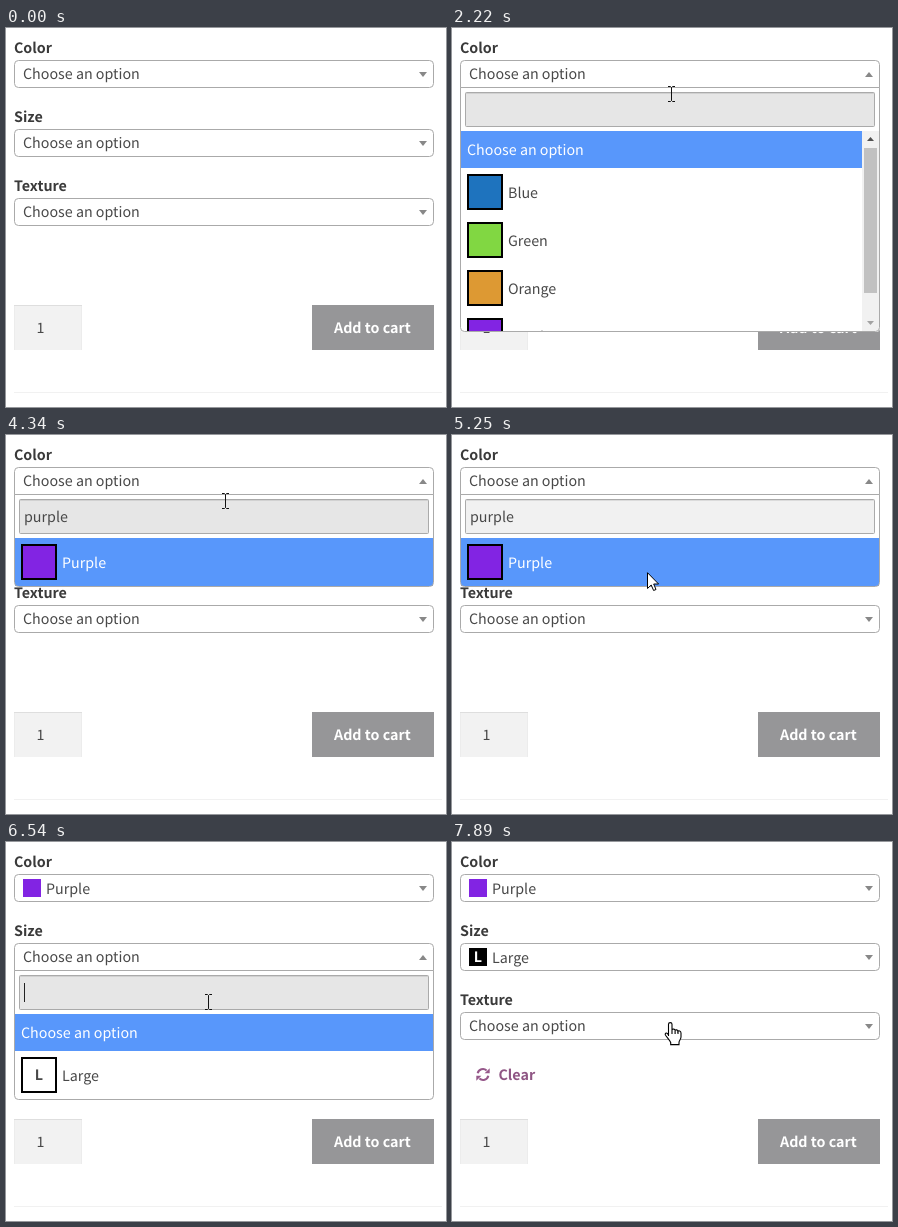
Write an HTML page that moves like this. It is 440 px wide and 379 px high and loops after 7.99 s.

```html
<!DOCTYPE html>
<html lang="en">
<head>
<meta charset="utf-8">
<title>Product options</title>
<style>
  html, body { margin: 0; width: 100%; height: 100%; overflow: hidden; background: #fff; }
  svg { display: block; width: 440px; height: 379px; }
  text {
    font: 14.29px "Noto Sans CJK JP", "Noto Sans CJK SC", "Noto Sans CJK", "Noto Sans", sans-serif;
    fill: #484848;
    text-rendering: geometricPrecision;
    white-space: pre;
  }
  .bold { font-weight: 700; }
  .label { font-weight: 700; fill: #3a3a3a; }
  .white { fill: #fff; }
  .mid { text-anchor: middle; }
</style>
</head>
<body>
<svg id="stage" viewBox="0 0 440 379"></svg>
<script>
const LOOP = 7990;
const PURPLE = '#8224e3', BLUE = '#5897fb';
const stage = document.getElementById('stage');

// Each table holds [start time, value]; the latest started value counts.
const OPEN = [[0, ''], [1580, 'color'], [5350, ''], [6080, 'size'], [7340, '']];
const TYPED = [[0, ''], [3060, 'p'], [3240, 'pu'], [3420, 'pur'], [3610, 'purp'],
  [3695, 'purpl'], [3780, 'purple'], [5350, '']];
const CARET = [[0, 1], [2140, 0], [2600, 1], [4340, 0], [4790, 1], [5170, 0],
  [6080, 1], [6620, 0]];
const FOCUS = [[0, 1], [5170, 0], [6080, 1], [7160, 0]];
const POINTER = [[0, ''], [220, 'arrow'], [1400, 'hand'], [2220, 'beam'], [4790, 'arrow'],
  [5710, 'hand'], [6440, 'beam'], [6620, 'hand'], [7340, 'arrow'], [7800, 'hand']];

// Pointer moves: first step, last step, steps, end x, end y, sideways bow.
const START = [213, 330];
const MOVES = [
  [220, 950, 9, 228, 269, 25],
  [1030, 1400, 5, 217, 47, 0],
  [2140, 2220, 2, 219, 66, 0],
  [4700, 4880, 3, 204, 147, 0],
  [5080, 5250, 3, 195, 137, 0],
  [5440, 5980, 7, 227, 110, 0],
  [6440, 6800, 5, 164, 234, 0],
  [7520, 7890, 5, 218, 180, 0]
];

const COLORS = [['Blue', '#1e73be'], ['Green', '#81d742'], ['Orange', '#dd9933'], ['Purple', PURPLE]];

const SHAPES = {
  arrow: '<path fill="#fff" stroke="#000" d="M.5 .7V16.5L4.2 13L6.6 18.5L9 17.5L6.7 12H11.6Z"/>',
  hand: '<g transform="translate(-5.5 0)" stroke="#000" stroke-width="1.1">' +
    '<path fill="#fff" d="M4 14V2.3C4 .1 7.5 .1 7.5 2.3V8C7.8 6.6 10.4 6.8 10.6 8.5' +
    'C11 7.4 13.4 7.7 13.5 9.3C14 8.4 16.5 8.8 16.5 11V15C16.5 17.5 14.5 18.5 14.5 20.5V22.6H6.2V20.5' +
    'C5.5 18.5 2.5 15.5 1 13.3C0 11.6 1.8 10.2 3 11.6L4 13Z"/>' +
    '<path fill="none" d="M7.5 8V12M10.6 8.5V12M13.5 9.3V12"/></g>',
  beam: '<path fill="none" stroke="#111" d="M-3 -7.5H-.5L.5 -6.5L1.5 -7.5H4M.5 -6.5V6.5M-3 7.5H-.5L.5 6.5L1.5 7.5H4"/>'
};

const valueAt = (table, t) => table.reduce((v, [start, next]) => t >= start ? next : v, table[0][1]);

function pointerAt(t) {
  let [x, y] = START;
  for (const [from, to, steps, endX, endY, bow] of MOVES) {
    if (t < from) break;
    const gap = (to - from) / (steps - 1);
    const done = Math.min(steps, Math.floor((t - from) / gap + 1.001));
    const k = done / steps;
    x += (endX - x) * k + bow * Math.sin(Math.PI * k);
    y += (endY - y) * k;
    if (done < steps) break;
  }
  return [Math.round(x), Math.round(y)];
}

const rect = (x, y, w, h, fill, more = '') =>
  `<rect x="${x}" y="${y}" width="${w}" height="${h}" fill="${fill}" ${more}/>`;
const frame = (x, y, w, h, r, fill, stroke = '#aaa') =>
  rect(x + .5, y + .5, w - 1, h - 1, fill, `rx="${r}" stroke="${stroke}"`);
const text = (x, y, str, cls = '') => `<text x="${x}" y="${y}" class="${cls}">${str}</text>`;

// Outline with separate radii for the top and the bottom corners.
function outline(top, bottom, rt, rb, fill) {
  const t = top + .5, b = bottom - .5;
  return `<path fill="${fill}" stroke="#aaa" d="M8.5 ${t + rt}q0 ${-rt} ${rt} ${-rt}H${427.5 - rt}` +
    `q${rt} 0 ${rt} ${rt}V${b - rb}q0 ${rb} ${-rb} ${rb}H${8.5 + rb}q${-rb} 0 ${-rb} ${-rb}Z"/>`;
}

function select(y, label, value, open) {
  const tip = open ? `M413 ${y + 17}h8l-4 -5z` : `M413 ${y + 12}h8l-4 5z`;
  return text(8, y - 7, label, 'label') + outline(y, y + 28, 4, open ? 0 : 4, '#fff') +
    value + `<path fill="#888" d="${tip}"/>`;
}

const placeholder = y => text(17, y + 19, 'Choose an option');

function chosen(y, name, fill, letter = '') {
  return rect(17, y + 5, 18, 18, fill) + text(26, y + 19, letter, 'bold white mid') +
    text(40, y + 20, name);
}

function option(y, item, active) {
  const [name, fill, letter] = item;
  const height = fill ? 48 : 37;
  const back = active ? BLUE : fill ? '#fff' : '#ddd';
  const cls = active ? 'white' : '';
  const body = fill
    ? rect(16, y + 7, 34, 34, fill, 'stroke="#000" stroke-width="2"') +
      text(33, y + 29, letter || '', 'bold mid') + text(56, y + 30, name, cls)
    : text(15, y + 24, name, cls);
  return [rect(9, y, 418, height, back) + body, height];
}

function scrollbar(y, total) {
  return rect(410, y, 17, 200, '#f1f1f1') + rect(412, y + 17, 13, 166 * 200 / total, '#c1c1c1') +
    `<path fill="#505050" d="M415 ${y + 10}h7l-3.5 -4z"/><path fill="#a3a3a3" d="M415 ${y + 190}h7l-3.5 4z"/>`;
}

function dropdown(y, items, active, s) {
  const listTop = y + 43;
  let rows = '', total = 0;
  items.forEach((item, i) => {
    const [markup, height] = option(listTop + total, item, i === active);
    rows += markup;
    total += height;
  });
  const shown = Math.min(total, 200), end = listTop + shown + 1;
  return rect(8, y, 420, end - y, '#fff', 'rx="4"') +
    `<clipPath id="list">${rect(9, listTop, 418, shown, '#fff')}</clipPath>` +
    `<g clip-path="url(#list)">${rows}${total > 200 ? scrollbar(listTop, total) : ''}</g>` +
    outline(y - 1, end, 0, 4, 'none') +
    frame(13, y + 4, 410, 35, 1, s.focus ? '#e6e6e6' : '#f1f1f1') +
    rect(14, y + 5, 408, 1, '#000', 'opacity=".09"') +
    `<text id="query" x="18" y="${y + 27}">${s.typed}</text>` +
    (s.caret ? rect(18, y + 12, 1, 19, '#222', 'id="caret"') : '');
}

function clearLink() {
  const half = '<path fill="none" stroke="#96588a" stroke-width="2.1" d="M-5.3 -1.2A5.4 5.4 0 0 1 3.6 -4"/>' +
    '<path fill="#96588a" d="M6.7 -6.3V-1.2H1.6Z"/>';
  return `<g transform="translate(31 232.5)">${half}<g transform="rotate(180)">${half}</g></g>` +
    '<g style="--c:0">' + text(46.5, 238, 'Clear', 'bold').replace('<text', '<text style="fill:#8f5684"') + '</g>';
}

function stateAt(t) {
  const [x, y] = pointerAt(t);
  return {
    open: valueAt(OPEN, t), typed: valueAt(TYPED, t), caret: valueAt(CARET, t),
    focus: valueAt(FOCUS, t), pointer: valueAt(POINTER, t), x, y,
    color: t >= 5350, size: t >= 7340
  };
}

function draw(s) {
  const none = ['Choose an option'];
  let out = rect(0, 0, 440, 379, '#fff') +
    select(32, 'Color', s.color ? chosen(32, 'Purple', PURPLE) : placeholder(32), s.open === 'color') +
    select(101, 'Size', s.size ? chosen(101, 'Large', '#000', 'L') : placeholder(101), s.open === 'size') +
    select(170, 'Texture', placeholder(170), false) +
    (s.color ? clearLink() : '') +
    rect(8, 277, 68, 45, '#f2f2f2') + rect(8, 277, 68, 1, '#dedede') +
    rect(8, 278, 1, 44, '#ececec') + rect(75, 278, 1, 44, '#ececec') +
    text(30.5, 305, '1') +
    rect(306, 277, 122, 45, '#969698') + text(328, 305, 'Add to cart', 'bold white') +
    rect(8, 364, 428, 1, '#f1f1f1');

  if (s.open === 'color') {
    const items = [none, ...COLORS].filter(([name]) => name.toLowerCase().includes(s.typed));
    out += dropdown(60, items, 0, s);
  } else if (s.open === 'size') {
    out += dropdown(129, [none, ['Large', '#fff', 'L']], s.y >= 209 ? 1 : 0, s);
  }
  if (s.pointer) out += `<g transform="translate(${s.x} ${s.y})">${SHAPES[s.pointer]}</g>`;
  stage.innerHTML = out;

  const caret = document.getElementById('caret');
  if (caret && s.typed) {
    const width = document.getElementById('query').getComputedTextLength();
    caret.setAttribute('x', Math.round(18 + width));
  }
}

const begin = performance.now();
let last = '';
function tick() {
  const s = stateAt((performance.now() - begin) % LOOP);
  const key = JSON.stringify(s);
  if (key !== last) {
    last = key;
    draw(s);
  }
  requestAnimationFrame(tick);
}
tick();
</script>
</body>
</html>
```
